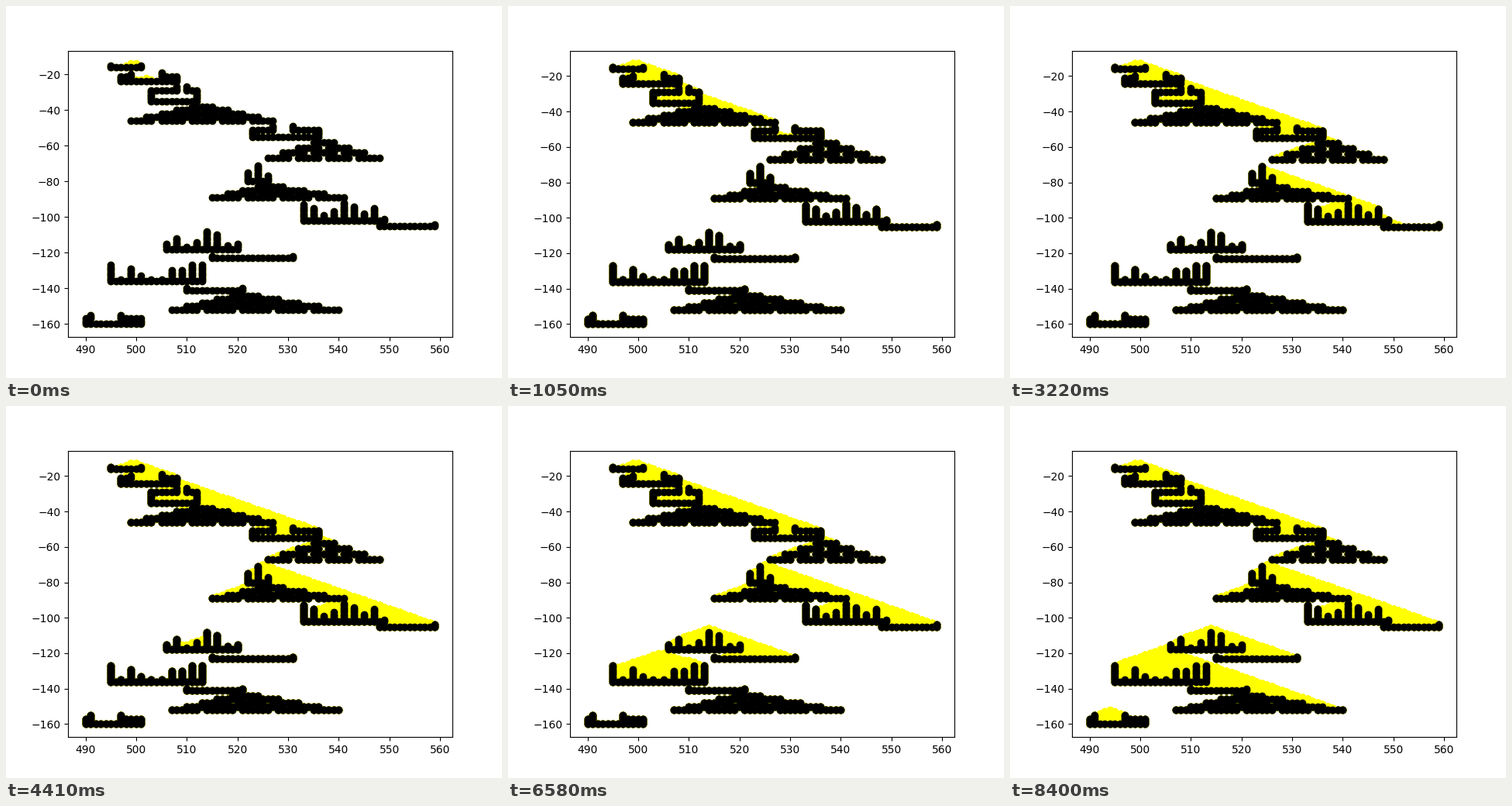
These frames come from a looping animation (640 px wide and 480 px high, 8.47 s). A matplotlib script:

```python
import numpy as np
import matplotlib.pyplot as plt
from matplotlib.animation import FuncAnimation

FRAMES = 121
INTERVAL = 70
LAYERS = 10          # repeated drawing hardens the marker edges
SOURCE = (500, 0)
GAP = 3              # free depth above each ledge

rock = set()


def wall(*points):
    """Axis-aligned polyline of rock cells, as (x, depth) corners."""
    for (x0, y0), (x1, y1) in zip(points, points[1:]):
        for x in range(min(x0, x1), max(x0, x1) + 1):
            for y in range(min(y0, y1), max(y0, y1) + 1):
                rock.add((x, y))


# Each ledge hangs below depth y and returns the depth of its own floor.

def tray(y, x, width, extra=0):
    floor = y + GAP + extra
    wall((x, floor - 1), (x, floor), (x + width, floor), (x + width, floor - 1))
    return floor


def jar(y, x, width, height, neck, lip=2):
    """Vessel with a narrow neck between two offsets from its left side."""
    shoulder = y + GAP + 2
    floor = shoulder + height
    left, right = x + neck[0], x + neck[1]
    wall((left, shoulder - lip), (left, shoulder), (x, shoulder), (x, floor),
         (x + width, floor), (x + width, shoulder), (right, shoulder),
         (right, shoulder - 2))
    return floor


def pyramid(y, x, rows, length, pitch=2):
    """Each row has one dash more and starts three cells further left."""
    for r in range(rows):
        floor = y + GAP + r * pitch
        for k in range(r + 1):
            left = x - 3 * r + k * (length + 2)
            wall((left, floor), (left + length, floor))
    return floor


def comb(y, x, *teeth):
    """A floor with a tooth of the given height on every second cell."""
    floor = y + GAP + 10
    wall((x, floor), (x + 2 * len(teeth) - 2, floor))
    for k, height in enumerate(teeth):
        wall((x + 2 * k, floor - height), (x + 2 * k, floor))
    return floor


y = tray(13, 495, 6)
y = jar(y, 497, 11, 3, neck=(2, 8), lip=1)
y = jar(y, 503, 9, 6, neck=(5, 7))
y = pyramid(y, 511, rows=5, length=4)
y = jar(y, 523, 13, 4, neck=(4, 8))
y = pyramid(y, 535, rows=4, length=4, pitch=3)
y = comb(y, 522, 5, 9, 3)
y = pyramid(y, 524, rows=4, length=5)
y = comb(y, 533, 9, 7, 3, 5, 10, 8, 4, 7, 1)
y = tray(y, 548, 11)
y = comb(y, 506, 3, 6, 1, 4, 10, 8, 2, 3)
y = tray(y, 515, 16, extra=2)
y = comb(y, 495, 9, 1, 7, 3, 1, 1, 6, 6, 9, 9)
y = tray(y, 510, 11, extra=2)
y = pyramid(y, 519, rows=5, length=5)
bottom = jar(y, 490, 11, 3, neck=(1, 7))


def pour():
    """Resting cells of the grains, in order, until one falls past the floor."""
    filled = set(rock)
    grains = []
    while True:
        x, y = SOURCE
        while y <= bottom:
            for nx in (x, x - 1, x + 1):
                if (nx, y + 1) not in filled:
                    x, y = nx, y + 1
                    break
            else:
                break
        if y > bottom or (x, y) == SOURCE:
            return grains
        filled.add((x, y))
        grains.append((x, y))


rocks = np.array(sorted(rock)) * (1, -1)
sand = np.array(pour()) * (1, -1)
cells = np.vstack([rocks, sand])
per_frame = round(len(sand) / FRAMES)


def shown(i):
    """Rock plus the grains at rest in step i."""
    return cells[:len(rocks) + per_frame * (i + 1)]


def padded(values, margin=0.05):
    pad = margin * np.ptp(values)
    return values.min() - pad, values.max() + pad


fig, ax = plt.subplots(figsize=(6.4, 4.8), dpi=100)
ax.set_xlim(padded(rocks[:, 0]))
layers = []
for _ in range(LAYERS):
    yellow, = ax.plot(*rocks.T, "o", color="yellow")
    black, = ax.plot(*rocks.T, "o", color="black")
    layers.append((yellow, black))


def update(i):
    for age, (yellow, black) in enumerate(reversed(layers)):
        step = i - age
        yellow.set_visible(step >= 0)
        black.set_visible(step >= 0)
        if step >= 0:
            yellow.set_data(*shown(step).T)
    ax.set_ylim(padded(shown(i)[:, 1]))
    return [artist for pair in layers for artist in pair]


anim = FuncAnimation(fig, update, frames=FRAMES, interval=INTERVAL,
                     init_func=lambda: update(0), repeat=True,
                     repeat_delay=0, blit=False)
plt.show()
```
